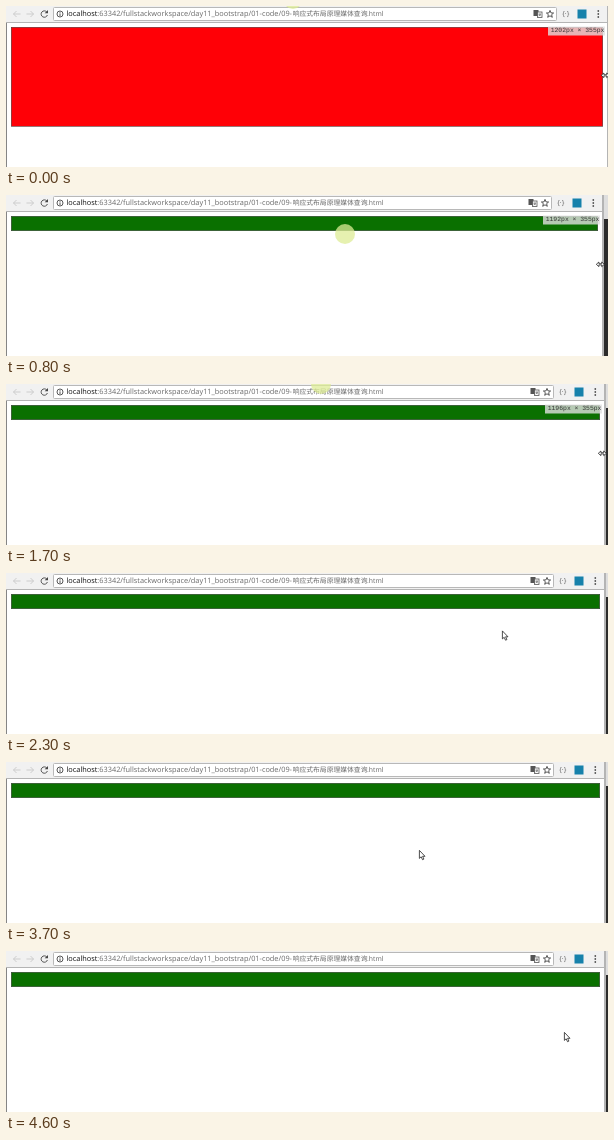
An HTML page that plays this animation: 602x161 px, repeating every 4700 ms.

```html
<!DOCTYPE html>
<html lang="zh">
<head>
<meta charset="utf-8">
<title>Responsive layout demo</title>
<style>
  html, body { margin: 0; width: 100%; height: 100%; overflow: hidden; background: #fff; }
  svg { display: block; width: 602px; height: 161px; }
  text { text-rendering: geometricPrecision; }
  .url { font: 7.37px "Open Sans", "Noto Sans", sans-serif; fill: #696969; }
  .cjk { font: 6.8px "Noto Sans CJK SC", "Noto Sans CJK", sans-serif; }
  .size { font: 6.4px "Liberation Mono", "DejaVu Sans Mono", monospace; fill: #333; }
  .icon { font: 7px "Open Sans", sans-serif; fill: #666; }
  .line { fill: none; stroke: #444; stroke-width: .9; }
  .faint { stroke: #c8c8c8; }
  .pointer { fill: #fff; stroke: #222; stroke-width: .8; }
</style>
</head>
<body>
<svg viewBox="0 0 602 161">
  <!-- window behind -->
  <rect width="602" height="161" fill="#2b2b2b"/>
  <rect width="602" height="24" fill="#dedede"/>

  <!-- browser window -->
  <rect id="border" height="161" fill="#b4b4b4"/>
  <rect id="viewport" height="161" fill="#fff"/>
  <rect id="toolbar" height="17" fill="#f1f1f1"/>
  <rect id="divider" y="16" height="1" fill="#b4b4b4"/>
  <rect y="17" width="1" height="144" fill="#858585"/>

  <path class="line faint" d="M14.5 8H7.5M10.5 5L7.5 8L10.5 11"/>
  <path class="line faint" d="M20.5 8H27.5M24.5 5L27.5 8L24.5 11"/>
  <path class="line" d="M40.8 6A3.2 3.2 0 1 0 41.4 9"/>
  <path d="M42 4V7.3H38.7Z" fill="#444"/>

  <rect id="omnibox" x="47.5" y="1.5" height="13" rx="1" fill="#fff" stroke="#b8b8b8"/>
  <circle class="line" cx="54" cy="8" r="3"/>
  <path class="line" d="M54 7.4V10M54 6V6.8"/>
  <text class="url" x="60.5" y="10.4"><tspan fill="#111">localhost</tspan>:63342/fullstackworkspace/day11_bootstrap/01-code/09-</text>
  <text class="url cjk" x="286.7" y="10.4">响应式布局原理媒体查询</text>
  <text class="url" x="361" y="10.4" style="font-size:6.8px">.html</text>

  <!-- toolbar icons, placed relative to the right edge -->
  <g id="icons">
    <rect x="-73.5" y="4" width="5" height="6" fill="#555"/>
    <rect x="-69.5" y="6" width="4.5" height="5.5" fill="#fff" stroke="#555" stroke-width=".8"/>
    <path class="line" d="M-68.5 8H-66M-68.3 10.2L-66.4 8M-68 8.4L-66.2 10.2" style="stroke-width:.6"/>
    <path class="line" d="M-57 4.4L-56 6.9L-53.4 7L-55.4 8.7L-54.7 11.3L-57 9.8L-59.3 11.3L-58.6 8.7L-60.6 7L-58 6.9Z"/>
    <text class="icon" x="-41.3" y="10.2" text-anchor="middle">{·}</text>
    <rect x="-29.5" y="3.5" width="9" height="9" fill="#1681ab"/>
    <path d="M-8.7 5v0M-8.7 8v0M-8.7 11v0" stroke="#555" stroke-width="1.8" stroke-linecap="round"/>
  </g>

  <!-- page -->
  <rect id="box" x="5.25" y="21.25" stroke="#333" stroke-width=".5"/>
  <g id="label">
    <rect x="-57" y="20.5" width="57" height="9" fill="#e1e1e1" fill-opacity=".8"/>
    <text id="size" class="size" x="-54.3" y="26.4"></text>
  </g>

  <circle id="halo" r="10" fill="#deec96" fill-opacity=".75"/>
  <path id="resizer" class="pointer" d="M-4 0L-1.4 -2.3V-.6H1.4V-2.3L4 0L1.4 2.3V.6H-1.4V2.3Z"/>
  <path id="arrow" class="pointer" d="M.4 .4V8.4L2.2 6.8L3.5 9.7L4.9 9.1L3.6 6.3H6Z"/>
</svg>
<script>
const LOOP = 4700, STEP = 100;
const DRAG_START = 700, DRAG_TIME = 500, RELEASE = 1900;

// Key points of the pointer's wander: [time, x, y]
const wander = [[2000, 493, 56], [2400, 497, 58], [2900, 561, 78], [3100, 568, 96],
  [3700, 413, 88], [4100, 470, 86], [4300, 419, 87], [4600, 558, 81]];

const $ = id => document.getElementById(id);
const set = (id, attrs) => {
  for (const name in attrs) $(id).setAttribute(name, attrs[name]);
};
const move = (id, x, y = 0) => set(id, { transform: `translate(${x} ${y})` });
const show = (id, visible) => set(id, { visibility: visible ? "visible" : "hidden" });

const progress = (t, start, duration) => Math.min(1, Math.max(0, (t - start) / duration));
const mix = (a, b, k) => a + (b - a) * k;

// The dragged edge swings around its final place and settles.
function pageWidth(t) {
  if (t < DRAG_START) return t < 200 ? 1202 : 1201;
  const p = progress(t, DRAG_START, DRAG_TIME);
  return Math.round(1196 + 5 * (1 - p) * Math.cos(5 * Math.PI * p));
}

// The halo flies in from above, rests, and leaves again.
function haloAt(t) {
  const arrive = progress(t, 0, 200), leave = progress(t, 1500, 400);
  return [mix(287, 339, arrive) - 48 * leave, mix(-7, 39, arrive) - 78 * leave];
}

function arrowAt(t) {
  const i = Math.max(1, wander.findIndex(key => key[0] >= t));
  const [t0, x0, y0] = wander[i - 1], [t1, x1, y1] = wander[i];
  const k = progress(t, t0, t1 - t0);
  return [mix(x0, x1, k), mix(y0, y1, k)];
}

function draw(t) {
  const page = pageWidth(t);
  const wide = page > 1200;
  // The window frame reacts to the drag before the page does.
  const right = (t < DRAG_START ? page : Math.min(page, 1197)) / 2;
  const dragging = t < RELEASE;

  set("border", { width: right + 2 });
  for (const id of ["viewport", "toolbar", "divider"]) set(id, { width: right });
  set("omnibox", { width: right - 98 });
  move("icons", right);

  set("box", {
    width: page / 2 - 9.5,
    height: wide ? 99 : 14.5,
    fill: wide ? "#ff0006" : "#0a7000"
  });
  $("size").textContent = `${page}px × 355px`;
  move("label", page / 2 - 2);
  move("halo", ...haloAt(t));
  move("resizer", right - 1.7, 69.3);
  move("arrow", ...arrowAt(t));

  show("label", dragging);
  show("resizer", dragging);
  show("arrow", !dragging);
}

function frame() {
  const t = performance.now() % LOOP;
  draw(Math.floor(t / STEP) * STEP);
  requestAnimationFrame(frame);
}
frame();
</script>
</body>
</html>
```
